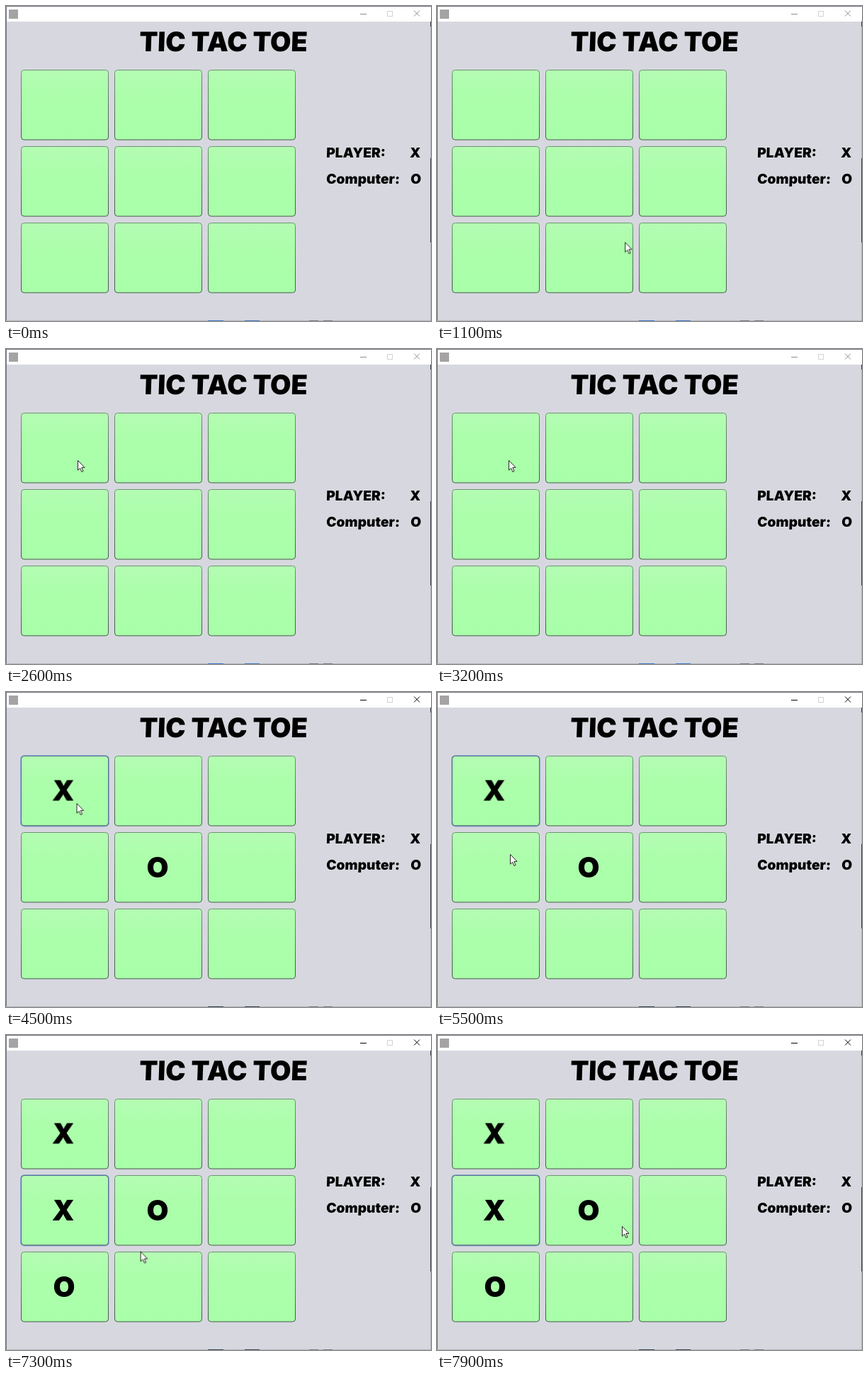
Animation of 600 by 445 pixels, one loop 8 s. Source, as an HTML page:

```html
<!DOCTYPE html>
<html lang="en">
<head>
<meta charset="utf-8">
<title>Tic Tac Toe</title>
<style>
html, body { margin: 0; width: 100%; height: 100%; overflow: hidden; background: #d7d8df; }
svg { display: block; width: 100%; height: 100%; }
text { font: 900 19.2px Inter, "Open Sans", sans-serif; text-anchor: middle; }
.title { font-size: 38px; }
.mark { font-size: 40px; }
.label { text-anchor: start; }
.chrome, .desk, .opening, .focus-top, .reply { animation: 8s step-end infinite; }
.chrome { stroke: #8c8c8c; animation-name: activate; }
.desk { animation-name: dim; }
.opening { animation-name: opening; }
.focus-top { animation-name: focus-top; }
.reply { animation-name: reply; }
.cursor { animation: move 8s infinite; }

@keyframes activate { 0% { stroke: #8c8c8c } 50%, 100% { stroke: #000 } }
@keyframes dim { 0% { opacity: 1 } 50%, 100% { opacity: 0 } }
@keyframes opening { 0% { opacity: 0 } 51.25%, 100% { opacity: 1 } }
@keyframes focus-top { 0% { opacity: 0 } 50% { opacity: 1 } 71.25%, 100% { opacity: 0 } }
@keyframes reply { 0% { opacity: 0 } 71.25%, 100% { opacity: 1 } }

/* Each segment advances once per 100 ms. */
@keyframes move {
  0% { transform: translate(330px, 360px); opacity: 0; animation-timing-function: step-end }
  11.25% { transform: translate(330px, 360px); opacity: 1; animation-timing-function: steps(7) }
  20%, 23.75% { transform: translate(103px, 267px); animation-timing-function: steps(7) }
  32.5%, 50% { transform: translate(101px, 157px); animation-timing-function: steps(1) }
  51.25%, 61.25% { transform: translate(99.5px, 157px); animation-timing-function: steps(6) }
  68.75%, 71.25% { transform: translate(103px, 229px); animation-timing-function: steps(6) }
  78.75%, 83.75% { transform: translate(87px, 350px); animation-timing-function: steps(10) }
  96.25% { transform: translate(258px, 276px); animation-timing-function: steps(2) }
  98.75%, 100% { transform: translate(261px, 270px); opacity: 1 }
}
</style>
</head>
<body>
<svg viewBox="0 0 600 445" preserveAspectRatio="none">
  <defs>
    <linearGradient id="face" x2="0" y2="1">
      <stop stop-color="#b4fcb3"/>
      <stop offset=".35" stop-color="#acfeab"/>
      <stop offset="1" stop-color="#a9ffa9"/>
    </linearGradient>
    <linearGradient id="edge" x2="0" y2="1">
      <stop stop-color="#6d9473"/>
      <stop offset="1" stop-color="#43584a"/>
    </linearGradient>
    <g id="cell">
      <rect x=".5" y=".5" width="123" height="98.5" rx="4" fill="url(#face)" stroke="url(#edge)"/>
    </g>
    <g id="row">
      <use href="#cell"/>
      <use href="#cell" x="132"/>
      <use href="#cell" x="264"/>
    </g>
    <g id="ring" fill="none">
      <rect x="-.5" y="-.5" width="125" height="100.5" rx="5" stroke="#8faad6"/>
      <rect x=".5" y=".5" width="123" height="98.5" rx="4" stroke="#55728f"/>
    </g>
    <text id="x" class="mark" transform="skewX(-2)">X</text>
    <text id="o" class="mark">O</text>
  </defs>

  <rect width="600" height="445" fill="#d7d8df"/>
  <rect width="600" height="22" fill="#fff"/>
  <path d="M0 .5H600M.5 0V445" stroke="#717780" fill="none"/>
  <path d="M0 444.5H600M599.5 22V445" stroke="#b4b7bd" fill="none"/>
  <path d="M599.5 22V29M599.5 215V334" stroke="#363a40"/>
  <path fill="#33424f" d="M285 444h22v1h-22zM337 444h21v1h-21z"/>
  <path class="desk" fill="#3f78c4" d="M285 444h22v1h-22zM337 444h21v1h-21z"/>
  <path fill="#777b82" d="M428 444h13v1h-13zM448 444h13v1h-13z"/>
  <rect x="4" y="5" width="13" height="13" fill="#a5a3a3"/>
  <path class="chrome" d="M500 11.5H509M576 6.5L584 14.5M584 6.5L576 14.5" fill="none"/>
  <rect x="538.5" y="7.5" width="7" height="7" fill="none" stroke="#d2d2d2"/>

  <text class="title" transform="translate(306.5 63.5) skewX(-2)">TIC TAC TOE</text>
  <g transform="translate(452 213.5) skewX(-2)">
    <text class="label">PLAYER:</text>
    <text x="125.5">X</text>
  </g>
  <g transform="translate(452 251) skewX(-2)">
    <text class="label">Computer:</text>
    <text x="126.5">O</text>
  </g>

  <use href="#row" x="21" y="90"/>
  <use href="#row" x="21" y="198"/>
  <use href="#row" x="21" y="306"/>

  <use class="focus-top" href="#ring" x="21" y="90"/>
  <g class="opening">
    <use href="#x" x="80.5" y="153.5"/>
    <use href="#o" x="214" y="262"/>
  </g>
  <g class="reply">
    <use href="#ring" x="21" y="198"/>
    <use href="#x" x="80.5" y="261.5"/>
    <use href="#o" x="82" y="370"/>
  </g>

  <path class="cursor" d="M.5 .5V14.2L3.6 11.3 5.9 16.5 8 15.6 5.8 10.4H10Z" fill="#fff" stroke="#111" stroke-width=".9"/>
</svg>
</body>
</html>
```
